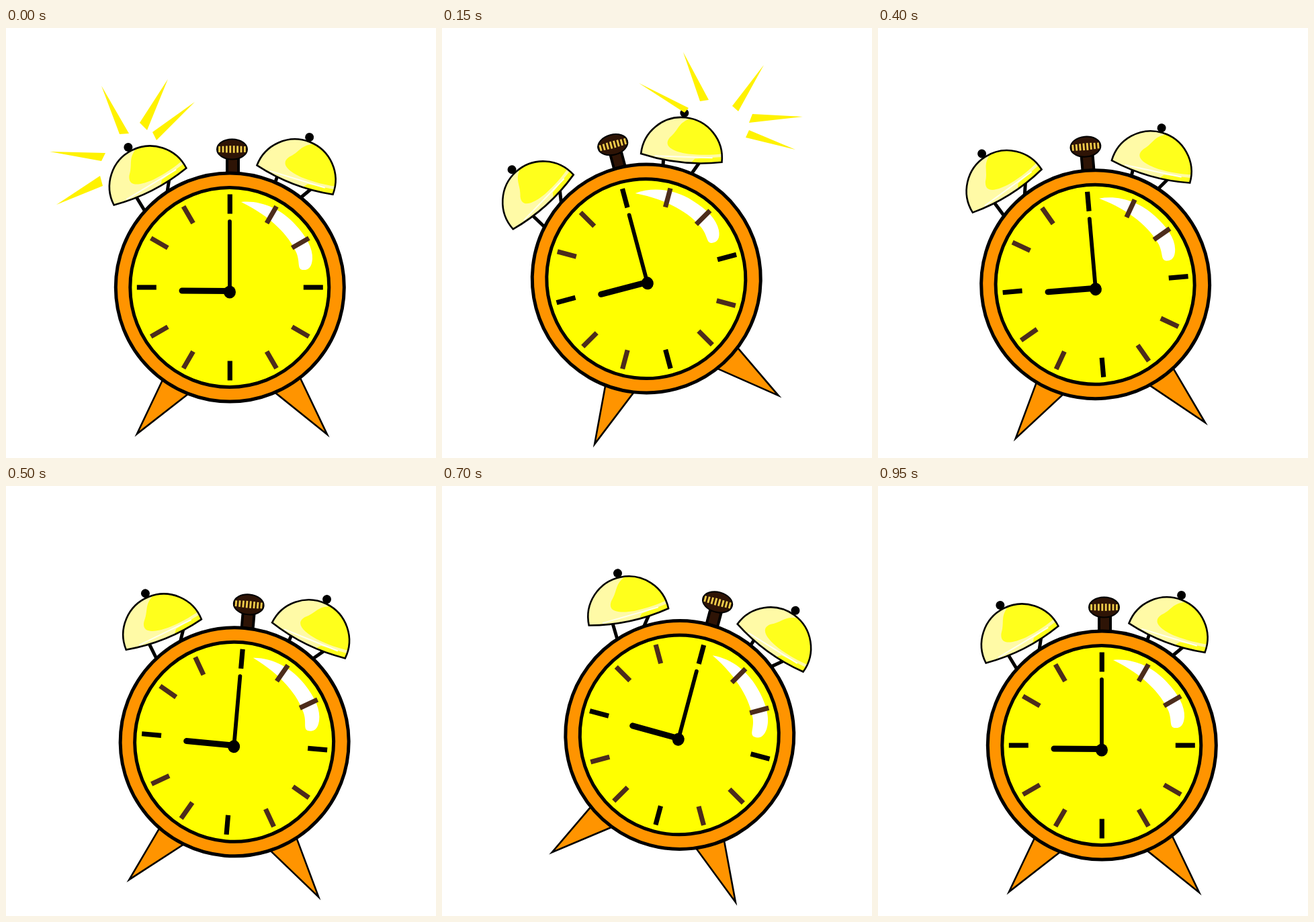
Recreate the animation shown at these times as an HTML page with a canvas. Size 640 px wide and 640 px high, loop 1 s.

```html
<!DOCTYPE html>
<html lang="en">
<head>
<meta charset="utf-8">
<title>Alarm clock</title>
<style>
  html, body { margin: 0; width: 100%; height: 100%; overflow: hidden; background: #fff; }
  canvas { display: block; width: 100vmin; height: 100vmin; }
</style>
</head>
<body>
<canvas id="stage" width="640" height="640"></canvas>
<script>
const ctx = document.getElementById('stage').getContext('2d');
const LOOP = 1000, STEP = 50;
const CX = 333.3, CY = 386;
const BLACK = '#000', YELLOW = '#ffff00', ORANGE = '#ff9400';
const BRIGHT = '#ffff1c', PALE = '#fffaa6';
const BROWN = '#4c2c1c', DARK = '#2e1406', BRASS = '#f0cc4a';

// Each ray: tip, then the two corners of its blunt end.
const LEFT_RAYS = [
  [142, 86, 169, 158, 183, 157],
  [241, 76, 199, 141, 210, 152],
  [281, 110, 218, 155, 224, 167],
  [65, 184, 148, 186, 142, 198],
  [75, 263, 140, 220, 144, 235]
];
const RIGHT_RAYS = [
  [293, 82, 367, 119, 361, 126],
  [359, 36, 384, 109, 397, 107],
  [479, 55, 432, 116, 441, 124],
  [537, 132, 462, 128, 457, 141],
  [526, 181, 457, 152, 452, 163]
];

// Rays showing in a given step: shape and offset.
const FLASHES = {
  0: [LEFT_RAYS, 0, 0],
  1: [LEFT_RAYS, -25, 9],
  2: [RIGHT_RAYS, 28, 9],
  3: [RIGHT_RAYS, 0, 0],
  18: [RIGHT_RAYS, 50, 47]
};

const rad = deg => deg * Math.PI / 180;

function paint(fill, stroke, width) {
  if (fill) { ctx.fillStyle = fill; ctx.fill(); }
  if (stroke) { ctx.strokeStyle = stroke; ctx.lineWidth = width; ctx.stroke(); }
}

function poly(p, fill, stroke, width) {
  ctx.beginPath();
  for (let i = 0; i < p.length; i += 2) ctx.lineTo(p[i], p[i + 1]);
  ctx.closePath();
  paint(fill, stroke, width);
}

function oval(x, y, rx, ry, fill, stroke, width) {
  ctx.beginPath();
  ctx.ellipse(x, y, rx, ry, 0, 0, Math.PI * 2);
  paint(fill, stroke, width);
}

function line(x1, y1, x2, y2, width, color = BLACK, cap = 'butt') {
  ctx.lineCap = cap;
  ctx.beginPath();
  ctx.moveTo(x1, y1);
  ctx.lineTo(x2, y2);
  paint(null, color, width);
}

function dome() {
  ctx.beginPath();
  ctx.ellipse(0, 0, 60.5, 60.5, 0, Math.PI, Math.PI * 2);
  ctx.quadraticCurveTo(0, 13, -60.5, 0);
  ctx.closePath();
}

function bell(x, y, deg) {
  ctx.save();
  ctx.translate(x, y);
  ctx.rotate(rad(deg));
  oval(-2.5, -67, 6.5, 6.5, BLACK);
  dome();
  paint(PALE);
  ctx.save();
  ctx.clip();
  ctx.beginPath();
  ctx.moveTo(4, -58);
  ctx.bezierCurveTo(-10, -51, -9, -40, -20, -29);
  ctx.bezierCurveTo(-31, -13, -10, -8, 10, -7);
  ctx.bezierCurveTo(30, -7, 45, -9, 62, -13);
  ctx.lineTo(62, -70);
  ctx.lineTo(4, -70);
  paint(BRIGHT);
  poly([20, -1, 62, -8, 62, 12, 10, 12], BRIGHT);
  line(-40, 1, 46, -5, 2, '#fffff0');
  ctx.restore();
  dome();
  paint(null, BLACK, 2.6);
  ctx.restore();
}

function crown() {
  poly([329, 194, 346, 194, 346, 216, 329, 216], DARK, BLACK, 4);
  oval(336.5, 180.5, 22.5, 15, DARK, BLACK, 2);
  for (let i = -3.5; i <= 3.5; i++) {
    const x = 336.5 + i * 5.4, h = 5.5 - Math.abs(i) * 0.3;
    line(x, 180.5 - h, x, 180.5 + h, 2.8, BRASS);
  }
}

function shine() {
  ctx.beginPath();
  ctx.moveTo(350, 259);
  ctx.bezierCurveTo(380, 256, 410, 270, 430, 292);
  ctx.bezierCurveTo(447, 310, 457, 328, 456, 344);
  ctx.bezierCurveTo(455, 356, 450, 361, 441, 360);
  ctx.bezierCurveTo(433, 358, 438, 348, 432, 334);
  ctx.bezierCurveTo(421, 309, 395, 281, 350, 259);
  paint('#fff');
}

// A mark centred at (x, y) from the middle of the face.
function mark(x, y, deg, color) {
  const dx = Math.cos(rad(deg)) * 14.5, dy = Math.sin(rad(deg)) * 14.5;
  line(CX + x - dx, CY + y - dy, CX + x + dx, CY + y + dy, 7.2, color);
}

function marks() {
  for (const sx of [-1, 1]) {
    mark(sx * 124, 0, 0, BLACK);
    mark(0, sx * 124, 90, BLACK);
    for (const sy of [-1, 1]) {
      mark(sx * 62, sy * 108, sx * sy * 60, BROWN);
      mark(sx * 105, sy * 66, sx * sy * 30, BROWN);
    }
  }
}

function clock() {
  poly([233, 524, 195, 604, 272, 544], ORANGE, BLACK, 2.6);
  poly([437, 519, 478, 605, 401, 543], ORANGE, BLACK, 2.6);

  line(193, 250, 207, 273, 5);
  line(243, 224, 240, 244, 5);
  line(404, 220, 400, 232, 5);
  line(456, 238, 438, 253, 5);
  bell(214.5, 236, -27);
  bell(430, 226, 21);
  crown();

  oval(CX, CY, 170, 170, ORANGE, BLACK, 5);
  oval(CX - 0.5, CY, 148, 148.5, YELLOW, BLACK, 5);
  shine();
  marks();

  line(262, 391, 333, 391.5, 9, BLACK, 'round');
  line(333, 393, 333, 288, 5.8, BLACK, 'round');
  oval(333, 393, 9, 9.5, BLACK);
}

// Tilt in degrees: swing left, hold, swing right, hold, return.
function tilt(n) {
  if (n <= 3) return -5 * n;
  if (n <= 6) return -15;
  if (n <= 12) return -15 + 5 * (n - 6);
  if (n <= 15) return 15;
  return Math.max(0, 15 - 5 * (n - 15));
}

function draw(ms) {
  const n = Math.floor((ms % LOOP) / STEP);
  const deg = tilt(n), k = deg / 15;
  ctx.fillStyle = '#fff';
  ctx.fillRect(0, 0, 640, 640);

  ctx.save();
  ctx.translate(CX + k * (k < 0 ? 29 : 20.5), CY - Math.abs(k) * (k < 0 ? 13 : 15.5));
  ctx.rotate(rad(deg));
  ctx.translate(-CX, -CY);
  clock();
  ctx.restore();

  const flash = FLASHES[n];
  if (!flash) return;
  const [rays, dx, dy] = flash;
  ctx.save();
  ctx.translate(dx, dy);
  for (const ray of rays) poly(ray, '#fff200');
  ctx.restore();
}

let start;
function tick(now) {
  if (start === undefined) start = now;
  draw(now - start);
  requestAnimationFrame(tick);
}
draw(0);
requestAnimationFrame(tick);
</script>
</body>
</html>
```
